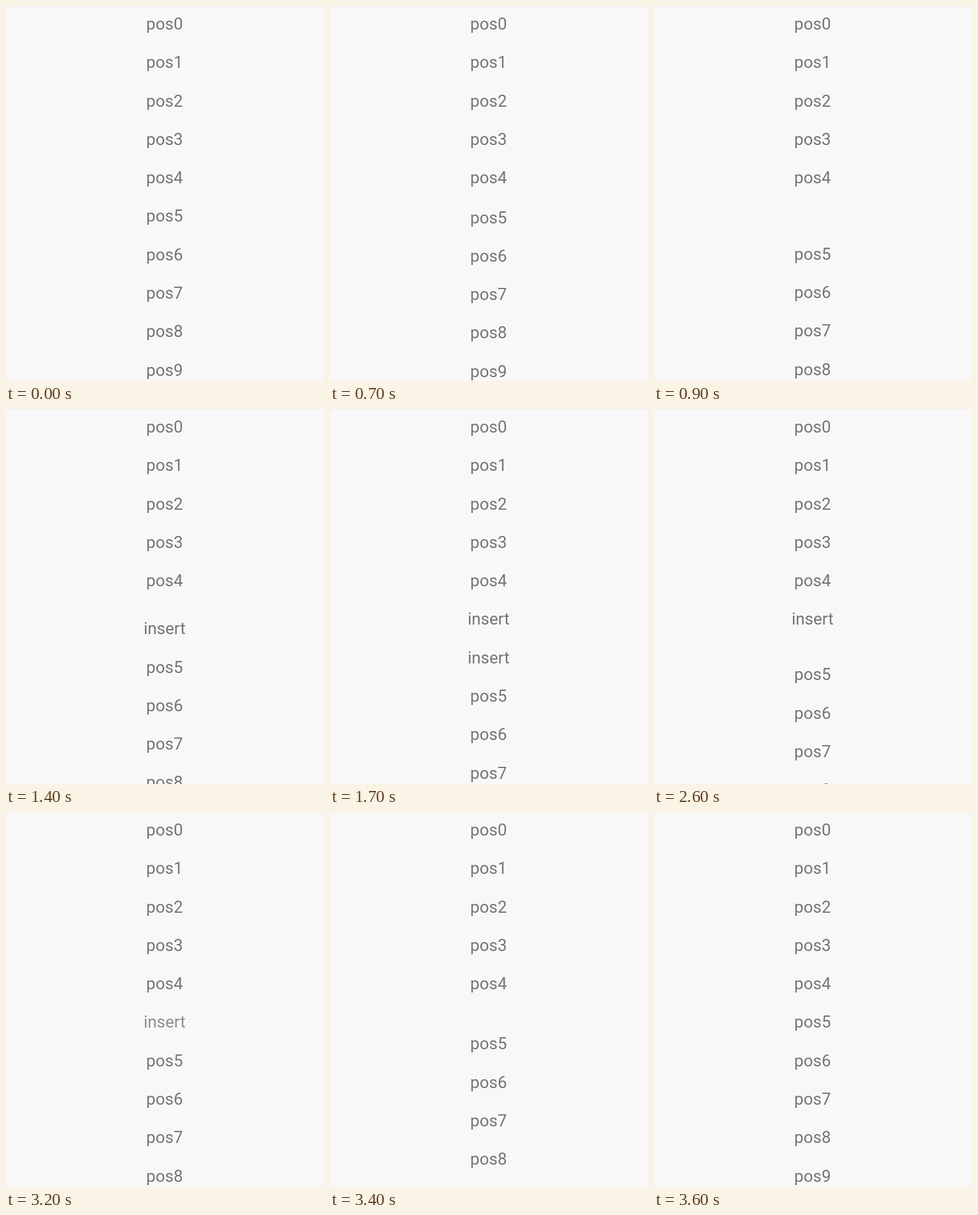
Recreate the animation shown at these times as an HTML page with a canvas. Size 499x588 px, loop 4300 ms.

```html
<!DOCTYPE html>
<html lang="en">
<head>
<meta charset="utf-8">
<style>
  html, body { margin: 0; width: 100%; height: 100%; overflow: hidden; background: #f8f8f8; }
  canvas { display: block; }
</style>
</head>
<body>
<canvas id="stage" width="499" height="588"></canvas>
<script>
const ctx = document.getElementById('stage').getContext('2d');
const LOOP = 4300, STEP = 100;
const ROW = 60.28, BASELINE = 37, CENTER = 248.8;
const MOVE = 250, FADE = 120;

// Accelerate-decelerate progress from 0 to 1
function ramp(time, start, duration) {
  const p = Math.min(1, Math.max(0, (time - start) / duration));
  return (1 - Math.cos(Math.PI * p)) / 2;
}

function label(text, row, alpha = 1) {
  ctx.globalAlpha = alpha;
  ctx.fillText(text, CENTER, BASELINE + row * ROW);
}

function draw(time) {
  const move = start => ramp(time, start, MOVE);
  const fade = start => ramp(time, start, FADE);

  ctx.globalAlpha = 1;
  ctx.fillStyle = '#f8f8f8';
  ctx.fillRect(0, 0, 499, 588);
  ctx.fillStyle = '#eeeeee';
  ctx.fillRect(0, 0, 499, 1);

  ctx.fillStyle = '#757575';
  ctx.font = '26px Roboto, sans-serif';
  ctx.textAlign = 'center';

  const secondPush = move(1317);
  const shift = move(670) + secondPush - move(2466) - move(3285);
  for (let i = 0; i < 10; i++) label('pos' + i, i < 5 ? i : i + shift);
  label('insert', 5 + secondPush, fade(920) - fade(2346));
  label('insert', 5, fade(1567) - fade(3165));
}

function tick() {
  // The picture advances in tenths of a second
  draw(Math.floor(performance.now() % LOOP / STEP) * STEP);
  requestAnimationFrame(tick);
}
tick();
</script>
</body>
</html>
```
